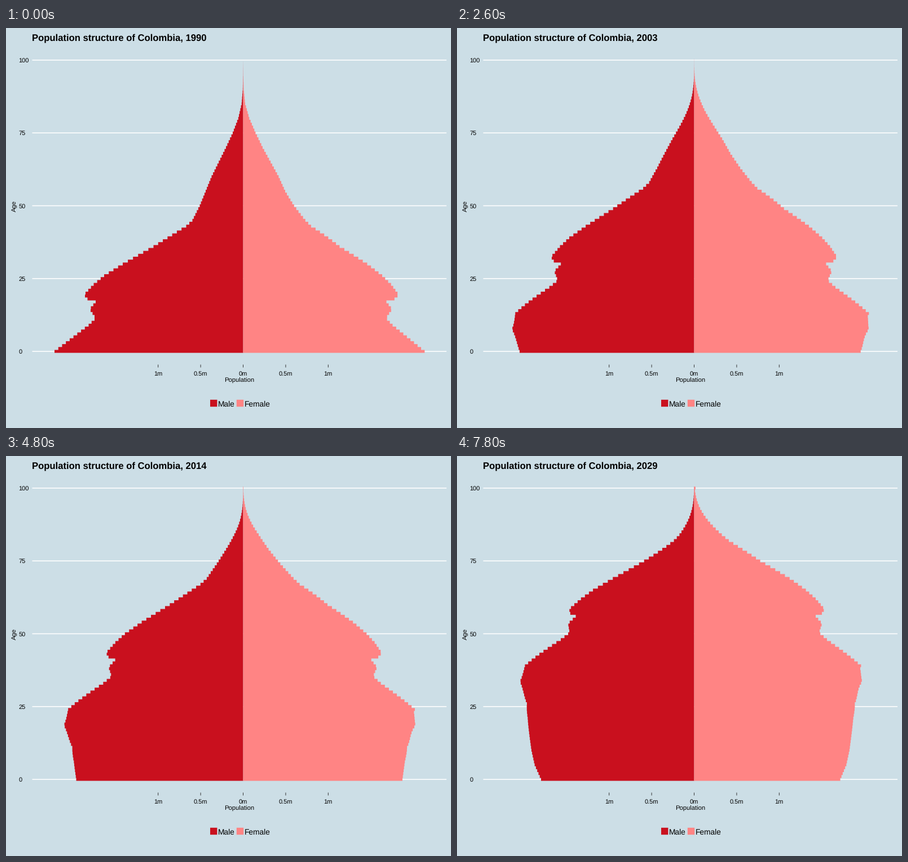
Animation, 789 px wide and 710 px high, one loop 8000 ms. Source, as a matplotlib script:

```python
import numpy as np
import matplotlib.pyplot as plt
from matplotlib.animation import FuncAnimation
from matplotlib.patches import Polygon, Rectangle

W, H, DPI = 789, 710, 100
BG, RED, PINK, INK = "#ccdee6", "#c9101e", "#ff8484", "#000000"
X0, Y0, STEP, HALF_M = 420.5, 574.0, 5.17, 75.4
FIRST, YEARS = 1990, 40
AGES = np.arange(101)

# Key points of the first pyramid (half-width in pixels) and of later births
MEN = {0: 334.5, 9: 274, 11: 263.5, 12: 263.5, 14: 270.5, 15: 270, 17: 261.5,
       18: 276, 19: 280.5, 20: 279.5, 23: 265, 26: 246.5, 30: 213.5, 36: 159,
       43: 101, 45: 90, 50: 77, 60: 56, 70: 30.5, 75: 18.5, 80: 8.7, 85: 2.7,
       90: 0.7, 95: 0.15, 100: 0}
WOMEN_PER_MAN = {0: 0.962, 18: 0.972, 26: 1, 36: 1.075, 45: 1.225, 55: 1.12,
                 70: 1.13, 85: 1.3}
BIRTHS = {1990: 334.5, 1995: 340, 1996: 338, 2003: 309.5, 2008: 302,
          2019: 291, 2024: 284, 2029: 271.5}
GIRLS_PER_BOY = 0.954


def along(points, x):
    return np.interp(x, list(points), list(points.values()))


def logistic(x):
    return 1 / (1 + np.exp(-x))


def loss(year, at_60, slope, peak, peak_year, spread):
    """Yearly loss rate by age: old age, a base rate and a wave of departures."""
    adult = logistic((AGES - 17) / 2.5)
    old = at_60 * np.exp(slope * (AGES - 60) - 0.01 * (year - 2005))
    base = 0.0008 + 0.0008 * adult
    wave = peak * np.exp(-((year - peak_year) / spread) ** 2 / 2)
    mobile = (0.2 + 0.8 * adult) * logistic((44 - AGES) / 6) + np.exp(-AGES / 4)
    return old + base + wave * mobile


def project(start, birth_share, **rates):
    """Age every cohort by one year per step; the last bar is 100 and over."""
    table = [start]
    for year in range(FIRST, FIRST + YEARS - 1):
        left = table[-1] * np.exp(-loss(year + 0.5, **rates))
        born = along(BIRTHS, year + 1) * birth_share
        aged = np.concatenate([[born], left[:-1]])
        aged[-1] += left[-1]
        table.append(aged)
    return table


def outline(widths, side):
    edges = Y0 - STEP * (np.arange(102) - 0.5)
    y = np.repeat(edges, 2)[1:-1]
    x = X0 + side * np.repeat(widths, 2)
    return np.vstack([[X0, y[0]], np.column_stack([x, y]), [X0, y[-1]]])


men = along(MEN, AGES)
women = men * along(WOMEN_PER_MAN, AGES)
male = project(men, 1, at_60=0.013, slope=0.1,
               peak=0.0095, peak_year=1998, spread=4.35)
female = project(women, GIRLS_PER_BOY, at_60=0.0075, slope=0.107,
                 peak=0.0098, peak_year=1999, spread=3)

plt.rcParams["font.family"] = "Liberation Sans"
plt.rcParams["text.hinting"] = "none"
fig = plt.figure(figsize=(W / DPI, H / DPI), dpi=DPI, facecolor=BG)
ax = fig.add_axes([0, 0, 1, 1])
ax.set_xlim(0, W)
ax.set_ylim(H, 0)
ax.axis("off")


def px(size):
    return size * 72 / DPI


def label(x, y, text, size=11, va="baseline", **kw):
    return ax.text(x, y, text, fontsize=px(size), color=INK, va=va, **kw)


def line(x, y, color, width):
    ax.plot(x, y, color=color, lw=px(width), solid_capstyle="butt",
            snap=False, zorder=1)


for age in range(0, 101, 25):
    y = Y0 - STEP * age
    line([46.5, 781], [y, y], "white", 1.6)
    label(22.3, y + 4, str(age))

for k, text in zip(range(-2, 3), ["1m", "0.5m", "0m", "0.5m", "1m"]):
    x = X0 + k * HALF_M
    line([x, x], [597.5, 602.5], "#333333", 1)
    label(x, 617, text, ha="center")

label(413.5, 629, "Population", 11.2, ha="center")
label(14.5, 316, "Age", 11.2, va="center", ha="center", rotation=90)

for x, color, text in [(362, RED, "Male"), (408.8, PINK, "Female")]:
    ax.add_patch(Rectangle((x, 659.8), 12.4, 12.4, fc=color, lw=0, snap=False))
    label(x + 14.2, 671.5, text, 13.75)

title = label(46, 22.5, "", 16.6, weight="bold")
sides = []
for table, side, color in [(male, -1, RED), (female, 1, PINK)]:
    patch = Polygon(outline(table[0], side), fc=color, lw=0, snap=False, zorder=2)
    ax.add_patch(patch)
    sides.append((patch, table, side))


def draw(n):
    title.set_text(f"Population structure of Colombia, {FIRST + n}")
    for patch, table, side in sides:
        patch.set_xy(outline(table[n], side))
    return [title] + [s[0] for s in sides]


anim = FuncAnimation(fig, draw, frames=YEARS, interval=200,
                     init_func=lambda: draw(0), repeat=True, repeat_delay=0)
plt.show()
```
